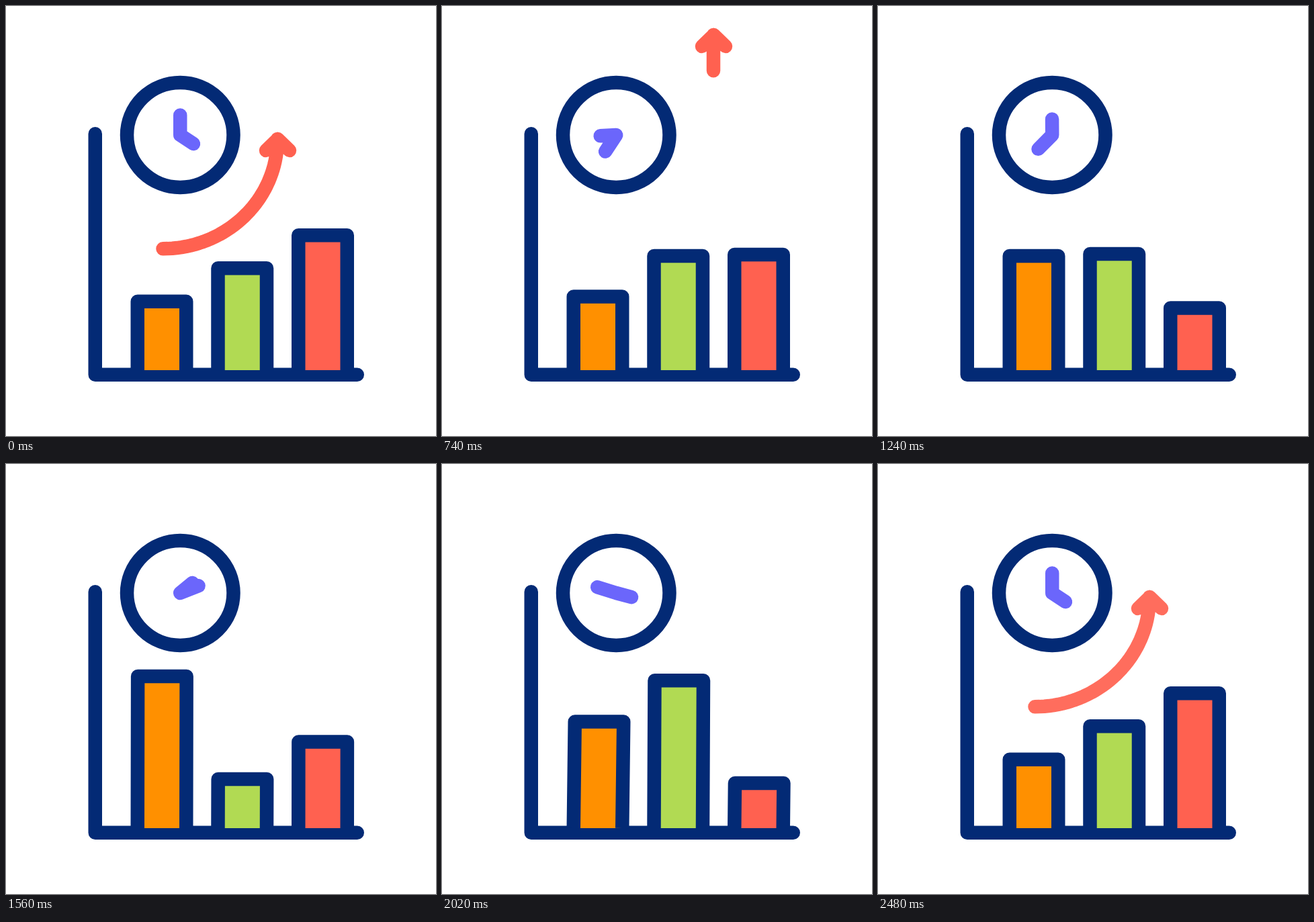
An HTML page with a canvas that plays this animation: 640 by 640 pixels, repeating every 2.62 s.

```html
<!DOCTYPE html>
<html lang="en">
<head>
<meta charset="utf-8">
<title>Growth over time</title>
<style>
  html, body { margin: 0; width: 100%; height: 100%; overflow: hidden; background: #fff; }
  canvas { display: block; }
</style>
</head>
<body>
<canvas id="stage" width="640" height="640"></canvas>
<script>
const ctx = document.getElementById('stage').getContext('2d');
const LOOP = 2620, LAST_POSE = 2480, MOVE_END = 2400;
const NAVY = '#032a75', VIOLET = '#6b66fb', CORAL = '#ff6150';

// Height of each bar's top edge over time: [ms, y]
const bars = [
  { fill: '#ff9000', lean: 2, keys: [[620, 439.75], [740, 432.5], [1240, 372], [1560, 316], [1640, 312], [2020, 383.5], [2400, 439.75]] },
  { fill: '#b1da53', lean: 1, keys: [[500, 390.25], [740, 372], [1090, 345], [1240, 369], [1560, 469], [1640, 478], [2020, 322.25], [2140, 302], [2400, 390.25]] },
  { fill: CORAL, lean: 0.7, keys: [[580, 341.25], [740, 370], [1020, 472], [1240, 449.5], [1560, 413.5], [1640, 410], [2020, 475], [2137, 512], [2400, 341.25]] }
];

const clamp = x => Math.min(1, Math.max(0, x));
const progress = (t, from, to) => clamp((t - from) / (to - from));
const smooth = x => x * x * (3 - 2 * x);
const cubic = (a, b, c, d, s) => {
  const r = 1 - s;
  return a * r ** 3 + 3 * b * s * r * r + 3 * c * s * s * r + d * s ** 3;
};

// cubic-bezier(.167, .167, .667, 1)
function easeOut(x) {
  let lo = 0, hi = 1;
  for (let i = 0; i < 24; i++) {
    const mid = (lo + hi) / 2;
    if (cubic(0, 0.167, 0.667, 1, mid) < x) lo = mid; else hi = mid;
  }
  return x >= 1 ? 1 : cubic(0, 0.167, 1, 1, lo);
}

// Monotone cubic interpolation, flat at turning points and ends
function follow(keys, t) {
  const last = keys.length - 1;
  if (t <= keys[0][0]) return keys[0][1];
  if (t >= keys[last][0]) return keys[last][1];
  const i = keys.findIndex(k => k[0] > t) - 1;
  const secant = j => (keys[j + 1][1] - keys[j][1]) / (keys[j + 1][0] - keys[j][0]);
  const slope = j => {
    if (j === 0 || j === last) return 0;
    const a = secant(j - 1), b = secant(j);
    return a * b > 0 ? 2 * a * b / (a + b) : 0;
  };
  const [t0, y0] = keys[i], [t1, y1] = keys[i + 1], third = (t1 - t0) / 3;
  return cubic(y0, y0 + slope(i) * third, y1 - slope(i + 1) * third, y1, (t - t0) / (t1 - t0));
}

function line(points, color, fill) {
  ctx.beginPath();
  points.forEach(p => ctx.lineTo(...p));
  if (fill) {
    ctx.fillStyle = fill;
    ctx.fill();
  }
  ctx.strokeStyle = color;
  ctx.stroke();
}

function drawBar({ fill, lean, keys }, index, t) {
  const x = 195.75 + 119.75 * index, width = 72.5, base = 542;
  const top = follow(keys, t);
  const shift = lean * progress(t, 1450, 2020) * (1 - progress(t, 2020, MOVE_END));
  ctx.lineCap = 'butt';
  line([[x, base], [x + shift, top], [x + width + shift, top], [x + width, base]], NAVY, fill);
  ctx.lineCap = 'round';
}

function drawClock(t) {
  const cx = 259.25, cy = 192;
  ctx.beginPath();
  ctx.ellipse(cx, cy, 79.25, 78, 0, 0, 2 * Math.PI);
  ctx.strokeStyle = NAVY;
  ctx.stroke();
  const turn = 360 * easeOut(progress(t, 0, MOVE_END));
  const tip = (degrees, length) => {
    const a = degrees * Math.PI / 180;
    return [cx + length * Math.sin(a), cy - length * Math.cos(a)];
  };
  line([tip(4 * turn, 29.4), [cx, cy], tip(123.4 + turn, 23.6)], VIOLET);
}

function drawArrow(t) {
  const returning = t >= MOVE_END;
  if (!returning && t > 950) return;
  const pull = returning ? 0 : smooth(progress(t, 250, 533));
  const rise = returning ? 0 : Math.max(0, t - 500) * 155 / 240;
  const tipX = 404.5, tipY = 198, steps = 40, shaft = [];
  for (let i = 0; i <= steps; i++) {
    const start = 0.793 * pull, s = start + (1 - start) * i / steps;
    const x = cubic(233.5, 328, 404, 404, s);
    shaft.push([x + (404 - x) * pull, cubic(361.25, 361.25, 288, tipY, s)]);
  }
  ctx.save();
  ctx.globalAlpha = returning ? easeOut(progress(t, MOVE_END, 2500)) : 1;
  ctx.translate(0, -rise);
  // One path keeps the overlap even while fading
  ctx.beginPath();
  shaft.forEach(p => ctx.lineTo(...p));
  ctx.moveTo(tipX - 17.5, tipY + 17);
  ctx.lineTo(tipX, tipY);
  ctx.lineTo(tipX + 17.5, tipY + 17);
  ctx.strokeStyle = CORAL;
  ctx.stroke();
  ctx.restore();
}

function draw(now) {
  const t = Math.min(now % LOOP, LAST_POSE);
  ctx.fillStyle = '#fff';
  ctx.fillRect(0, 0, 640, 640);
  ctx.lineWidth = 20.5;
  ctx.lineCap = ctx.lineJoin = 'round';
  line([[132.75, 190.25], [132.75, 548.75], [522.75, 548.75]], NAVY);
  bars.forEach((bar, i) => drawBar(bar, i, t));
  drawClock(t);
  drawArrow(t);
}

let begin;
function tick(now) {
  begin ??= now;
  draw(now - begin);
  requestAnimationFrame(tick);
}
requestAnimationFrame(tick);
</script>
</body>
</html>
```
